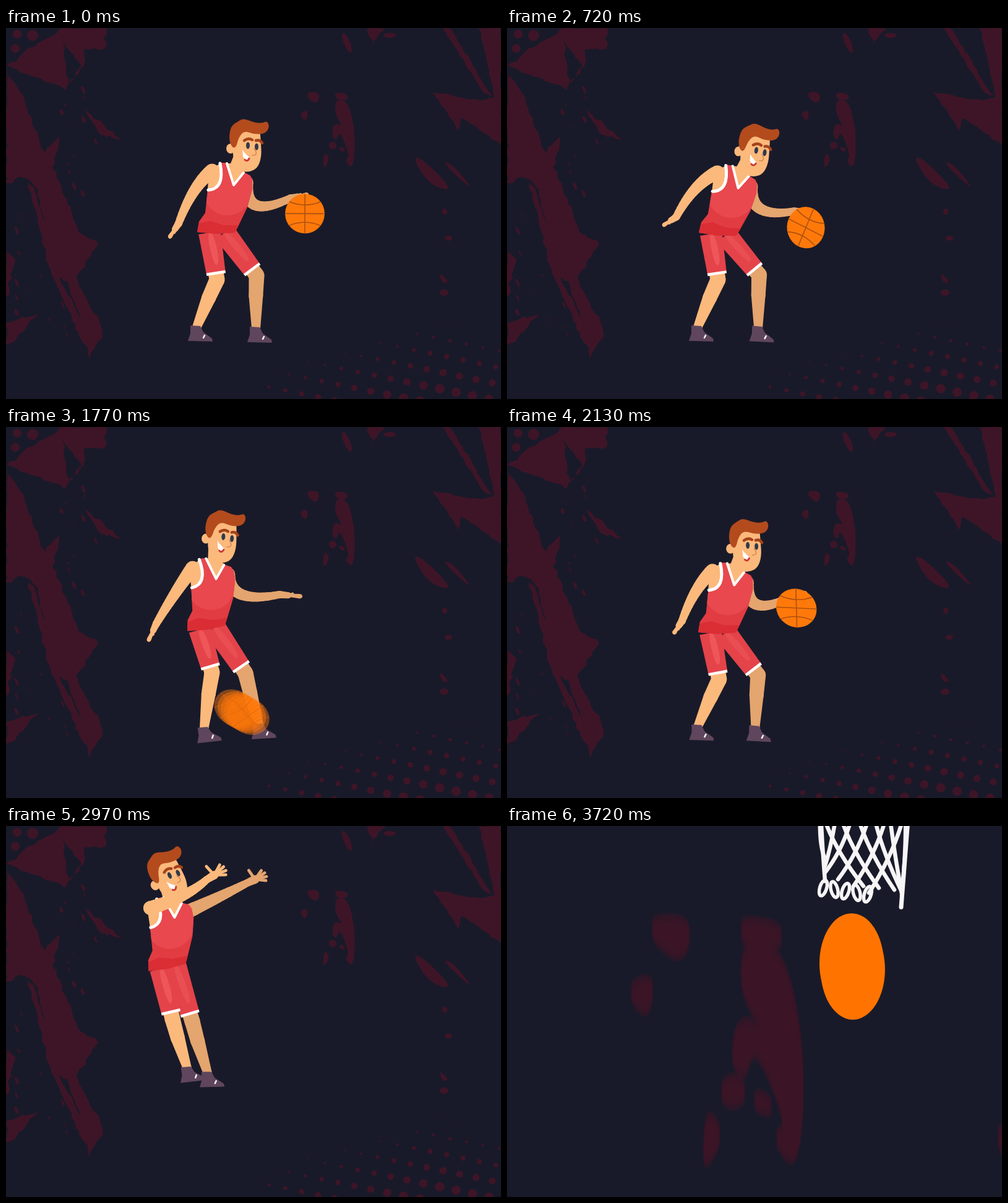
These frames come from a looping animation (800 px wide and 600 px high, 3.75 s). An HTML page with a canvas:

```html
<!DOCTYPE html>
<html lang="en">
<head>
<meta charset="utf-8">
<title>Jump shot</title>
<style>
html, body { margin: 0; width: 100%; height: 100%; overflow: hidden; background: #191a29; }
canvas { display: block; width: 800px; height: 600px; }
</style>
</head>
<body>
<canvas id="stage" width="800" height="600"></canvas>
<script>
const c = document.getElementById('stage').getContext('2d');
const LOOP = 3750, TAU = Math.PI * 2, RAD = Math.PI / 180;
const BG = '#191a29', SPLAT = '#3e1527', SKIN = '#fcb97c', SHADE = '#e4a56f', SHOE = '#5f465c', NET = '#f7f5f6';

const clamp = v => Math.min(1, Math.max(0, v));
const ease = u => u * u * (3 - 2 * u);
const mix = (a, b, u) => a.map((v, i) => v + (b[i] - v) * u);
const span = (t, a, b) => clamp((t - a) / (b - a));
const pairs = list => list.flatMap((v, i) => i % 2 ? [] : [[v, list[i + 1]]]);
// Neighbouring keys around t and the progress between them.
function keys(table, t) {
  const i = Math.max(1, table.findIndex(k => k[0] > t)), a = table[i - 1], b = table[i];
  return [a, b, span(t, a[0], b[0])];
}

// ---------- drawing helpers ----------
function poly(pts, color) {
  c.beginPath();
  pts.forEach(p => c.lineTo(...p));
  c.closePath();
  c.fillStyle = color;
  c.fill();
}
function soft(pts) {
  const n = pts.length, mid = i => mix(pts[i % n], pts[(i + 1) % n], .5), path = new Path2D();
  path.moveTo(...mid(n - 1));
  pts.forEach((p, i) => path.quadraticCurveTo(...p, ...mid(i)));
  path.closePath();
  return path;
}
function fill(path, color) { c.fillStyle = color; c.fill(path); }
function oval(x, y, rx, ry, color, tilt = 0) {
  c.beginPath();
  c.ellipse(x, y, rx, ry, tilt, 0, TAU);
  c.fillStyle = color;
  c.fill();
}
function stroke(width, color) {
  c.lineWidth = width;
  c.strokeStyle = color;
  c.stroke();
}
function line(pts, width, color) {
  c.beginPath();
  pts.forEach(p => c.lineTo(...p));
  stroke(width, color);
}
function curve(a, b, d, width, color) {
  c.beginPath();
  c.moveTo(...a);
  c.quadraticCurveTo(...b, ...d);
  stroke(width, color);
}
function at(x, y, deg, draw) {
  c.save();
  c.translate(x, y);
  c.rotate(deg * RAD);
  draw();
  c.restore();
}
// Tapered chain of [x, y, radius] joints.
function chain(joints, color) {
  joints.forEach(([x, y, r], i) => {
    oval(x, y, r, r, color);
    if (!i) return;
    const [px, py, pr] = joints[i - 1], d = Math.hypot(x - px, y - py) || 1;
    const nx = (py - y) / d, ny = (x - px) / d;
    poly([[px + nx * pr, py + ny * pr], [x + nx * r, y + ny * r],
      [x - nx * r, y - ny * r], [px - nx * pr, py - ny * pr]], color);
  });
}

// ---------- backdrop ----------
let seed = 7;
const rnd = () => (seed = seed * 16807 % 2147483647) / 2147483647;
const stains = [];
function stain(list, color = SPLAT, amp = 6) {
  const pts = pairs(list), path = new Path2D();
  pts.forEach((p, i) => {
    const q = pts[(i + 1) % pts.length], n = Math.ceil(Math.hypot(q[0] - p[0], q[1] - p[1]) / 9);
    for (let k = 0; k < n; k++) {
      const m = mix(p, q, k / n);
      path.lineTo(m[0] + (rnd() - .5) * amp, m[1] + (rnd() - .5) * amp);
    }
  });
  path.closePath();
  stains.push([path, color]);
}
function blot(list) { stains.push([soft(pairs(list)), SPLAT]); }

stain([88, 0, 161, 0, 160, 32, 128, 36, 122, 68, 95, 98, 0, 62]);
stain([0, 68, 36, 128, 62, 200, 84, 178, 76, 226, 118, 332, 150, 350, 112, 402, 158, 490, 136, 534, 70, 390, 32, 240, 0, 252]);
stain([0, 362, 14, 372, 0, 440]);
stain([0, 474, 52, 464, 12, 510, 0, 510]);
stain([130, 134, 184, 178, 150, 174]);
stain([92, 22, 122, 60, 100, 92], BG);
stain([36, 245, 52, 262, 64, 318], BG);
stain([84, 400, 98, 412, 122, 476], BG);
stain([765, 0, 800, 0, 800, 190, 737, 144, 731, 165, 690, 104, 768, 118, 790, 112], SPLAT, 3);
stain([706, 0, 719, 2, 786, 112, 772, 104], SPLAT, 3);
stain([586, 0, 612, 0, 592, 30]);
blot([533, 114, 554, 119, 565, 175, 561, 230, 547, 213, 556, 208, 539, 164, 534, 184, 526, 173, 531, 153, 545, 160, 531, 139]);
blot([531, 103, 553, 107, 552, 117, 533, 116]);
blot([486, 103, 508, 104, 503, 124, 488, 114]);
blot([473, 138, 489, 132, 485, 153]);
blot([514, 199, 524, 212, 512, 231]);
blot([656, 208, 674, 212, 726, 265, 684, 254]);
blot([703, 216, 722, 220, 760, 268]);
blot([700, 394, 717, 412, 704, 412]);

const specks = Array.from({ length: 34 }, (_, i) => {
  const y = 100 + i * 12;
  return [12 + rnd() * 130 + (y < 300 ? 25 : 0), y, .6 + rnd() * 2.2, 1 + rnd() * 6, SPLAT, -.4];
});
function backdrop() {
  stains.forEach(s => fill(...s));
  specks.forEach(s => oval(...s));
  oval(528, 190, 6, 6, SPLAT);
  oval(543, 196, 5, 3, SPLAT, .6);
  oval(709, 297, 4, 5, SPLAT);
  oval(715, 340, 6, 4, SPLAT);
  oval(708, 428, 7, 5, SPLAT);
  oval(620, 12, 10, 4, SPLAT);
  oval(551, 24, 5, 17, SPLAT, -.4);
  oval(18, 10, 7, 7, SPLAT);
  oval(43, 12, 9, 9, SPLAT);
  oval(15, 33, 7, 7, SPLAT);
  for (let i = -9; i < 6; i++) for (let j = -4; j < 6; j++) {
    const x = 680 + i * 26.5 + j * 5.5, y = 552 + i * 5.5 - j * 26;
    const r = 8.6 - (600 - y) * .06 - Math.abs(x - 700) * .018;
    if (r > .8 && y < 615) oval(x, y, r, r, SPLAT);
  }
}

// ---------- poses ----------
// body: hip x, y, lean; arms: elbow, wrist, fingertip, spread; legs: knee, ankle, foot turn
const ready = {
  body: [340, 331, 0], head: [385, 195, 0],
  near: [303, 262, 279, 316, 264, 339, 0], far: [400, 293, 460, 275, 488, 269, 0],
  legN: [341, 407, 306, 484, 0], legF: [405, 400, 402, 486, 0]
};
const push = {
  ...ready, body: [342, 338, 8.5], head: [412, 212, 17],
  near: [305, 252, 266, 291, 236, 292, 0], far: [414, 303, 470, 326, 501, 336, 0],
  legF: [411, 398, 407, 483, 4]
};
const cross = {
  body: [324, 326, -9], head: [345, 182, 4],
  near: [271, 272, 243, 318, 230, 346, 0], far: [376, 275, 442, 271, 478, 274, 0],
  legN: [333, 397, 318, 488, -8], legF: [387, 398, 407, 482, -5]
};
const left = { ...cross, body: [319, 323, -12], head: [331, 178, -2], near: [262, 280, 210, 304, 175, 296, 0] };
const crouch = {
  body: [340, 369, -12], head: [346, 227, -20],
  near: [338, 308, 363, 262, 381, 229, 1], far: [408, 308, 405, 270, 396, 248, .6],
  legN: [379, 430, 315, 486, 3], legF: [420, 430, 346, 476, 38]
};
const follow = {
  body: [261, 229, -12], head: [261, 87, -24],
  near: [288, 113, 324, 87, 355, 68, 1], far: [342, 116, 390, 92, 421, 78, 1],
  legN: [269, 312, 291, 392, -8], legF: [301, 316, 324, 400, -3]
};
const steps = [[0, ready], [270, push], [560, push], [850, ready], [900, ready], [1140, push], [1250, push],
  [1560, left], [1620, left], [1770, cross], [1800, cross], [2080, ready], [2470, crouch], [2540, crouch],
  [2860, follow], [LOOP, follow]];
function poseAt(t) {
  const [a, b, u] = keys(steps, t), out = {};
  for (const k in ready) out[k] = mix(a[1][k], b[1][k], ease(u));
  return out;
}

// time, x, y, spin
const flight = [[0, 483, 300, 0], [270, 488, 367, 50], [450, 490, 491, 110], [580, 488, 367, 150],
  [720, 483, 323, 205], [850, 483, 300, 180], [900, 483, 300, 180], [1140, 488, 367, 235],
  [1330, 350, 491, 150], [1500, 187, 352, 60], [1570, 175, 326, 50], [1630, 178, 348, 60], [1770, 380, 460, 140],
  [1800, 412, 491, 170], [1960, 472, 340, 330], [2080, 480, 300, 360], [2470, 386, 245, 365],
  [2560, 382, 230, 365], [2700, 364, 132, 380], [2800, 440, -70, 420], [LOOP, 900, -400, 500]];
function ballAt(t) {
  const [a, b, u] = keys(flight, t);
  return mix(a, b, u).slice(1);
}

// ---------- player ----------
function turn([x, y, deg], [px, py]) {
  const s = Math.sin(deg * RAD), k = Math.cos(deg * RAD);
  return [x + px * k - py * s, y + px * s + py * k];
}
function hand(w, tip, open, color) {
  const a = Math.atan2(tip[1] - w[1], tip[0] - w[0]), len = Math.hypot(tip[0] - w[0], tip[1] - w[1]);
  const base = mix(w, tip, .4);
  const finger = (ang, d) => line([base, [base[0] + d * Math.cos(ang), base[1] + d * Math.sin(ang)]], 4.8, color);
  chain([[...w, 6], [...base, 5 + open * 2]], color);
  for (let i = -1.5; i <= 1.5; i++) finger(a + i * (.05 + .3 * open), len * (.58 - Math.abs(i) * .04));
  finger(a - .4 - 1.35 * open, len * (.2 + .32 * open));
}
function arm(shoulder, v, color) {
  const e = v.slice(0, 2), w = v.slice(2, 4), k = mix(e, mix(shoulder, w, .5), -.6), pts = [];
  for (let u = 0; u <= 1; u += 1 / 16) pts.push([...mix(mix(shoulder, k, u), mix(k, w, u), u), 11.5 - u * 5.5]);
  chain(pts, color);
  hand(w, v.slice(4, 6), v[6], color);
}
function leg(hip, v, skin, glow) {
  const knee = v.slice(0, 2), foot = v.slice(2, 4), cuff = mix(hip, knee, .86);
  const calf = mix(knee, foot, .38), d = Math.hypot(knee[0] - hip[0], knee[1] - hip[1]);
  const side = (p, r) => [p[0] + (hip[1] - knee[1]) / d * r, p[1] + (knee[0] - hip[0]) / d * r];
  chain([[...cuff, 12.5], [...knee, 12.5], [...calf, 11.5], [foot[0] + 2, foot[1], 7]], skin);
  at(...foot, v[4], () => {
    poly(pairs([-8, -3, 8, -2, 13, 8, 27, 18, 28, 23, -12, 22, -8, 10]), SHOE);
    line([[13, 17], [15, 13]], 2.5, '#fff');
  });
  poly([side(hip, -18), side(cuff, -15.5), side(cuff, 15.5), side(hip, 18)], '#e4434a');
  fill(soft([side(hip, -6), side(mix(hip, cuff, .75), -9), side(mix(hip, cuff, .85), 1), side(hip, 5)]), glow);
  c.lineCap = 'butt';
  line([side(cuff, -15.5), side(cuff, 15.5)], 4.5, '#fff');
  c.lineCap = 'round';
}

const shirt = new Path2D();
pairs([5, -113, 17, -113, 28, -75, 44, -98, 55, -92, 58, -85, 58, -70, 50, -41, 38, -16, 30, 0, 0, 2, -31, -1,
  -28, -18, -18, -32, -14, -69, 4, -78, 9, -92]).forEach(p => shirt.lineTo(...p));
shirt.closePath();
function torso() {
  poly(pairs([16, -112, 28, -74, 45, -98, 34, -112]), SKIN);
  poly(pairs([5, -111, -12, -102, -14, -69, 10, -78]), SKIN);
  fill(shirt, '#e13c42');
  c.save();
  c.clip(shirt);
  oval(18, -75, 42, 47, '#e8484e');
  poly(pairs([-34, -14, -10, -19, 12, -12, 50, -12, 40, 6, -34, 6]), '#da2d34');
  c.restore();
  line([[17, -112], [28, -77], [44, -97]], 4, '#fff');
  curve([6, -112], [14, -71], [-13, -69], 5, '#fff');
}

const face = soft(pairs([-18, -28, -19, 8, -15, 24, -5, 37, 9, 38, 22, 31, 28, 13, 27, -10, 25, -34]));
const hair = soft(pairs([-19, -1, -25, -14, -22, -36, -10, -44, -1, -49, 16, -42, 29, -41, 37, -45, 41, -35,
  34, -24, 16, -23, 0, -29, -9, -18, -13, -2]));
function head() {
  oval(-22, 0, 7, 8, SKIN);
  fill(face, SKIN);
  fill(hair, '#b34b1d');
  curve([0, -13], [7, -18], [13, -14], 4.5, '#a5431b');
  curve([19, -13], [25, -15], [29, -9], 4.5, '#a5431b');
  oval(6, -5, 3, 5.5, '#30394b');
  oval(20, -3, 3, 5.5, '#30394b');
  curve([16, 0], [24, 11], [13, 11], 1.5, '#d08a52');
  poly(pairs([-3, 2, 0, 6, 9, 15, 3, 20, -2, 13]), '#fff');
  curve([1, 18], [5, 22], [8, 16], 3, '#c93a32');
}

function ball(t) {
  const [x, y, spin] = ballAt(t), [px, py] = ballAt(Math.max(0, t - 15));
  if (y < -60) return;
  const dx = x - px, dy = y - py, speed = Math.hypot(dx, dy) / 15;
  const dir = Math.atan2(dy, dx), s = 1 + Math.min(.11, speed * .16);
  const fast = speed > .75, copies = fast ? 5 : 1, ink = fast ? '#d9640f' : '#ad500f';
  for (let i = 0; i < copies; i++) {
    const u = fast ? i / 4 - .5 : 0;
    c.save();
    c.globalAlpha = fast ? .45 : 1;
    c.translate(x + dx * u, y + dy * u);
    c.rotate(dir);
    c.scale(s, 1 / s);
    c.rotate(-dir + spin * RAD);
    oval(0, 0, 32, 32, '#ff790a');
    line([[0, -31], [0, 31]], 1.6, ink);
    line([[-31, 0], [31, 0]], 1.6, ink);
    for (const k of [-1, 1]) curve([-25, k * 19], [0, k * 9], [25, k * 19], 1.6, ink);
    c.restore();
  }
}

function player(t) {
  const p = poseAt(t), on = q => turn(p.body, q), low = t < 2200;
  arm(on([48, -81]), p.far, SHADE);
  leg(on([13, 0]), p.legF, SHADE, '#e94e53');
  if (low) ball(t);
  leg(on([-11, 0]), p.legN, SKIN, '#ee5659');
  chain([[...on([28, -95]), 11], [...turn(p.head, [-4, 14]), 13]], SKIN);
  at(...p.body, torso);
  at(...p.head, head);
  if (!low) ball(t);
  arm(on([-7, -100]), p.near, SKIN);
}

// ---------- basket ----------
function rim(from, to) {
  c.beginPath();
  c.ellipse(577, -66, 80, 15, 0, from, to);
  stroke(9, '#e8502c');
}
function net() {
  for (let i = 0; i < 6; i++) {
    const x = 502 + i * 28, foot = 514 + i * 25;
    curve([x, -62], [x + 6, 10], [Math.min(foot + 62, 638), 96 + i * 3], 6.5, NET);
    curve([x + 8, -62], [x - 2, 20], [Math.max(foot - 54, 514), 52 + i * 11], 6.5, NET);
  }
  curve([506, -62], [507, 0], [514, 88], 6.5, NET);
  curve([652, -62], [644, 40], [637, 130], 7, NET);
  for (let i = 0; i < 5; i++) {
    c.beginPath();
    c.ellipse(511 + i * 18, 99 + i * 2.5, 5.5, 13, i % 2 ? -.25 : .3, 0, TAU);
    stroke(5.5, NET);
  }
}
const drop = [[3240, 190, 40], [3350, 370, -25], [3440, 500, -15], [3520, 568, 35], [3720, 558, 226], [LOOP, 556, 262]];
function closeBall(t) {
  const [a, b, u] = keys(drop, t), [, x, y] = mix(a, b, u), s = span(t, 3520, 3720);
  for (const k of [-1, 1]) oval(x + k * s, y + k * 5 * s, 58 - 6 * s, 58 + 23 * s, '#ff7400');
}

function frame(t) {
  const zoom = ease(span(t, 3030, 3270)), pan = 260 * (1 - ease(span(t, 3270, 3740)));
  const k = 1 + 2.2 * zoom, ox = -1324 * zoom, oy = (pan - 180) * zoom;
  const copies = zoom ? 7 : 1;
  c.setTransform(1, 0, 0, 1, 0, 0);
  c.globalAlpha = 1;
  c.lineCap = c.lineJoin = 'round';
  c.fillStyle = BG;
  c.fillRect(0, 0, 800, 600);
  c.globalAlpha = zoom ? .4 : 1;
  for (let i = 0; i < copies; i++) {
    c.setTransform(k, 0, 0, k, ox, oy + (zoom ? (i - 3) * 4 : 0));
    backdrop();
  }
  c.globalAlpha = 1;
  c.setTransform(k, 0, 0, k, ox, oy);
  if (zoom < 1) player(t);
  if (!zoom) return;
  const hoop = () => c.setTransform(1, 0, 0, 1, (1 - zoom) * 420, pan - (1 - zoom) * 300);
  hoop();
  rim(Math.PI, TAU);
  c.setTransform(1, 0, 0, 1, 0, 0);
  if (t > 3240) closeBall(t);
  hoop();
  net();
  rim(0, Math.PI);
}

const start = performance.now();
function tick() {
  frame((performance.now() - start) % LOOP);
  requestAnimationFrame(tick);
}
tick();
</script>
</body>
</html>
```
